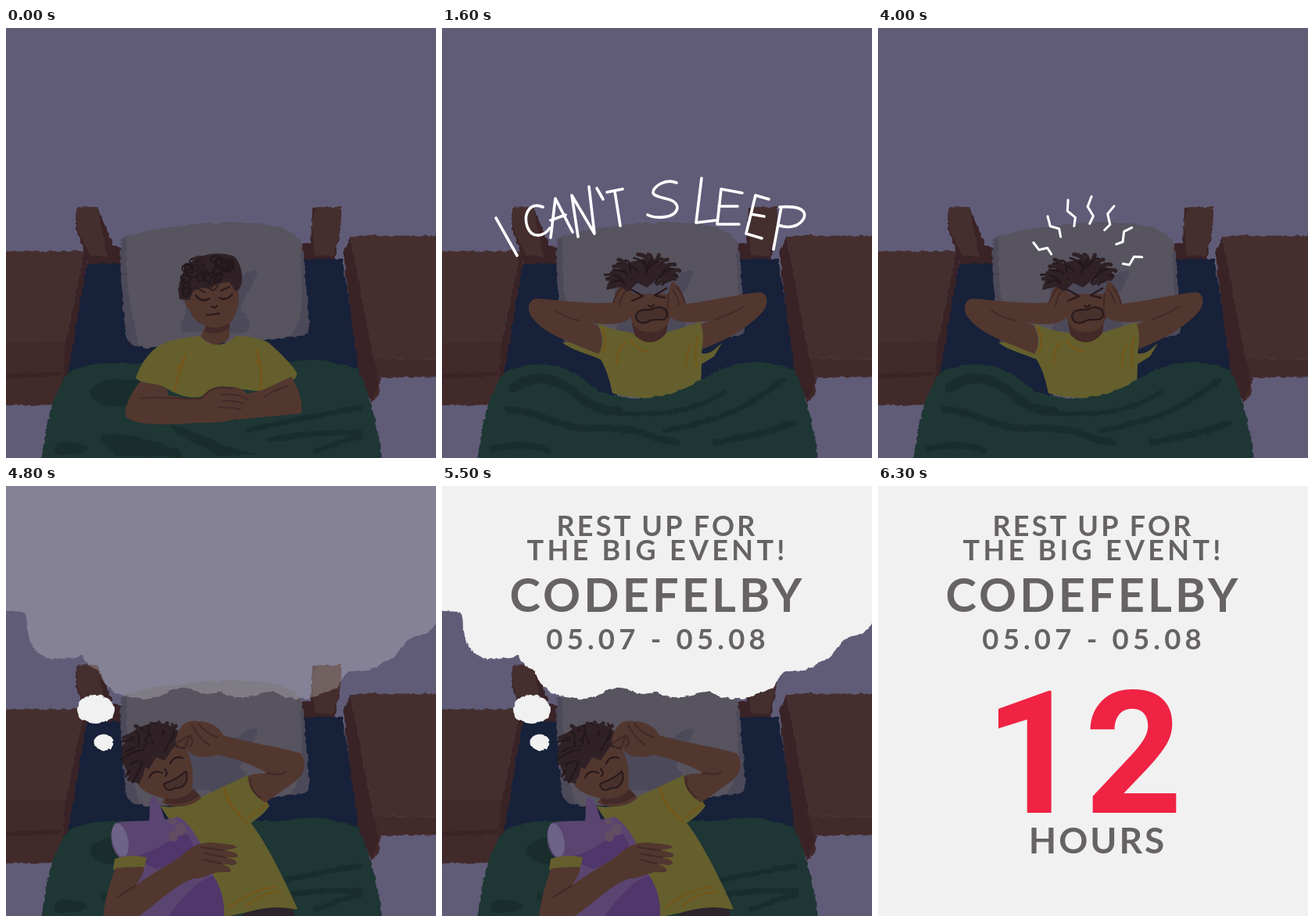
Write an HTML page that moves like this. It is 550 by 550 pixels and loops after 8.3 s.

```html
<!DOCTYPE html>
<html lang="en">
<head>
<meta charset="utf-8">
<title>Rest up</title>
<style>
  html, body { margin: 0; width: 100%; height: 100%; overflow: hidden; background: #605c78; }
  svg { display: block; width: 100vw; height: 100vh; }
  path, ellipse { stroke-linecap: round; stroke-linejoin: round; }
  .head { font-family: Lato, "Open Sans", sans-serif; font-weight: 700; fill: #676364; text-anchor: middle; }
  .count { font: 700 219px Roboto, "Open Sans", sans-serif; fill: #f02344; }
</style>
</head>
<body>
<svg id="stage" viewBox="0 0 550 550"></svg>
<script>
const LOOP = 8300;
const C = {
  wall: '#605c78', wood: '#452f2e', drawer: '#422a2a', woodDark: '#3a2326', navy: '#172139',
  pillow: '#57535f', fold: '#4c4959', green: '#1e3634', greenDark: '#192e2c',
  shirt: '#645f2d', crease: '#74561a', skin: '#52372f', skinDark: '#432927',
  hair: '#2f2125', strand: '#23181c', ink: '#291a1c', paper: '#f1f1f1',
  plush: '#5a4570', plushLight: '#6d6287', plushDark: '#50366a', pants: '#2d232a'
};

const fill = (d, color) => `<path d="${d}" fill="${color}"/>`;
const line = (d, color = C.ink, w = 2) => `<path d="${d}" fill="none" stroke="${color}" stroke-width="${w}"/>`;
const oval = (x, y, rx, ry, color, extra = '') =>
  `<ellipse cx="${x}" cy="${y}" rx="${rx}" ry="${ry}" fill="${color}" ${extra}/>`;
const group = (id, body) => `<g id="${id}">${body}</g>`;
const rough = body => `<g filter="url(#rough)">${body}</g>`;
const words = (text, y, size, gap) =>
  `<text class="head" x="${273.5 + gap / 2}" y="${y}" font-size="${size}" letter-spacing="${gap}">${text}</text>`;

function random(seed) {
  return () => (seed = (seed * 16807) % 2147483647) / 2147483647;
}

// Loose rings of curly hair inside an oval.
function curls(cx, cy, rx, ry, n, seed) {
  const r = random(seed);
  let out = '';
  for (let i = 0; i < n; i++) {
    const a = r() * 6.28, k = Math.sqrt(r()), w = 5 + r() * 4;
    const x = cx + rx * k * Math.cos(a), y = cy + ry * k * Math.sin(a);
    out += oval(x.toFixed(1), y.toFixed(1), w, w * .65, 'none',
      `stroke="${i % 3 ? C.strand : C.hair}" stroke-width="2" transform="rotate(${(r() * 180).toFixed()} ${x} ${y})"`);
  }
  return out;
}

// Uneven locks fanning out from a crown.
function locks(cx, cy, rx, ry, from, to, n, seed) {
  const r = random(seed);
  let out = '';
  for (let i = 0; i < n; i++) {
    const a = (from + (to - from) * i / (n - 1)) * Math.PI / 180, k = .78 + r() * .34;
    const s = .3 + r() * .35, bend = a + (r() - .3) * 1.1;
    const x = cx + rx * k * Math.cos(a), y = cy + ry * k * Math.sin(a);
    const x0 = cx + rx * s * Math.cos(bend), y0 = cy + ry * s * Math.sin(bend);
    out += line(`M${x0},${y0} Q${(x + x0) / 2 + 5},${(y + y0) / 2 - 7} ${x},${y}`, i % 2 ? C.strand : C.hair, i % 2 ? 2.5 : 5);
  }
  return out;
}

const room = rough(
  fill('M90,230 L117,229 L137,278 L147,280 L149,302 L106,303 L90,258Z', C.woodDark) +
  fill('M90,230 L117,229 L121,252 L130,292 L107,290 L91,257Z', C.wood) +
  fill('M392,230 L429,229 L428,256 L420,296 L378,298 L378,276 L390,274Z', C.woodDark) +
  fill('M397,229 L429,229 L428,254 L418,292 L396,290 L391,250Z', C.wood) +
  fill('M103,302 L430,295 L455,440 L455,470 L74,470 L80,405Z', C.navy) +
  fill('M-20,286 L100,285 L76,402 L-20,404Z', C.wood) +
  fill('M-20,403 L77,401 L73,470 L62,482 L-20,483Z', C.drawer) +
  fill('M100,285 L105,291 L97,340 L78,450 L73,452 L76,402Z', C.woodDark) +
  line('M-20,447 L68,442', C.woodDark, 6) +
  fill('M441,266 L570,265 L570,424 L470,422Z', C.wood) +
  fill('M470,422 L570,424 L570,446 L479,447 L477,470 L467,479 L460,446Z', C.drawer) +
  fill('M441,266 L470,422 L477,455 L467,478 L452,447 L434,310 L432,284Z', C.woodDark) +
  fill('M148,268 C190,255 260,247 310,249 C350,251 375,262 379,278 C382,320 388,360 388,385 C385,398 360,394 330,399 C270,405 210,409 180,409 C160,407 153,400 154,390 C149,350 145,300 148,268Z', C.pillow) +
  fill('M147,269 L154,268 C152,320 160,370 170,406 C155,405 153,395 153,388 C148,345 145,300 147,269Z', C.fold) +
  fill('M379,284 C382,330 387,360 388,385 C385,394 375,395 362,395 C380,385 382,340 376,290Z', C.fold) +
  fill('M224,320 C250,300 285,330 300,320 C310,308 321,308 321,314 C317,330 300,348 300,360 C318,378 315,392 295,390 L225,389 C219,378 231,366 230,354 C222,345 215,335 224,320Z', C.fold)
);

const quilt = d => fill(d, C.green);
const flat = rough(
  quilt('M43,575 C48,515 62,445 90,435 C125,424 150,432 190,428 L360,428 C395,418 430,430 449,436 C462,460 480,515 483,575Z') +
  fill('M108,462 C120,446 150,448 172,452 L165,474 C160,488 138,484 128,483 C115,478 105,472 108,462Z', C.greenDark) +
  fill('M62,540 C60,526 85,528 104,534 C110,542 95,546 62,546Z', C.greenDark) +
  fill('M121,520 C155,516 190,528 222,540 L225,548 L140,547 C135,535 120,534 121,520Z', C.greenDark) +
  fill('M210,508 C245,512 260,535 325,545 L270,547 C245,530 220,525 210,508Z', C.greenDark) +
  line('M310,515 Q370,500 452,486', C.greenDark, 7) +
  line('M338,527 Q390,515 453,518 M396,541 Q425,530 453,522', C.greenDark, 7)
);
const lump = rough(
  quilt('M43,575 C48,515 62,445 90,435 C130,424 160,432 185,452 C207,474 235,474 270,472 C320,468 335,440 375,430 C405,424 435,430 450,438 C462,460 480,515 483,575Z') +
  line('M92,460 C120,440 145,448 165,463 C185,480 200,490 225,490', C.greenDark, 12) +
  line('M85,488 C130,490 145,515 200,512 S260,525 300,530', C.greenDark, 9) +
  line('M225,492 C280,498 330,488 362,465', C.greenDark, 6) +
  line('M285,515 C340,505 390,490 436,450', C.greenDark, 7) +
  line('M350,530 Q410,520 450,505 M65,538 Q110,528 135,541', C.greenDark, 8)
);

const shutEyes = line('M243,342 Q250,352 260,346 M273,345 Q281,350 289,341', C.ink, 2.6) +
  line('M244,332 L254,338 M275,336 L286,331');
const openEyes = [251, 281].map(x => oval(x, 344, 7, 5, '#8b8587') + oval(x, 344, 3.2, 4, C.ink) +
  line(`M${x - 8},343 Q${x},336 ${x + 8},343`)).join('') + line('M242,334 Q250,329 257,333 M275,333 Q283,329 289,333');
const face = fill('M230,340 C230,328 240,315 265,315 C292,314 298,328 298,345 C297,362 292,371 286,378 L286,395 C278,408 260,408 249,394 L255,381 C243,377 236,366 234,359 C228,355 228,346 230,340Z', C.skin) +
  fill('M255,381 Q270,387 286,378 L286,384 Q270,395 255,388Z', C.skinDark) +
  line('M263,356 Q267,360 270,355');
const curly = fill('M222,347 C219,330 224,308 239,298 C252,287 280,286 293,293 C303,305 304,324 299,333 L294,337 L285,324 C270,326 258,336 248,332 L239,337 L235,348Z', C.hair) +
  curls(262, 312, 34, 18, 36, 71) + curls(229, 332, 4, 12, 6, 9);
const tee = fill('M205,402 C220,397 238,395 248,394 C260,409 283,408 293,394 C312,394 328,398 335,402 C350,414 367,432 372,441 C372,453 358,452 352,458 L330,465 C300,462 280,458 262,464 C250,475 236,474 222,469 L212,465 C195,452 172,457 166,447 C174,425 188,408 205,402Z', C.shirt) +
  line('M229,419 C224,440 217,450 216,464 M229,421 L219,436 M321,412 C326,430 328,448 325,464 M321,425 L327,437', C.crease, 3);
const folded = fill('M172,452 C160,466 150,487 153,497 C165,509 205,508 242,505 C290,506 307,498 309,488 L250,473 C236,478 222,470 207,470 L206,462 C195,453 180,456 172,452Z', C.skin) +
  fill('M328,463 L365,446 C374,460 380,480 378,493 C350,496 320,498 296,501 L300,470Z', C.skin) +
  fill('M248,478 C252,466 264,458 282,459 C300,457 315,468 310,482 C302,496 270,494 248,490Z', C.skin) +
  line('M172,474 C200,470 230,476 250,474 C262,458 275,458 288,461 M276,469 C290,468 305,470 310,476 M277,477 Q293,476 304,481 M272,485 Q290,485 300,488 M330,472 Q345,462 361,458', C.skinDark, 2);
const supine = eyes => tee + folded + face + curly + eyes + line('M257,367 Q265,367 273,365');

const side = fill('M190,402 C220,393 245,394 270,398 C310,396 342,405 352,425 L345,462 C300,462 265,470 220,468 C175,470 140,462 134,445 C148,420 170,408 190,402Z', C.shirt) +
  line('M215,415 C205,438 190,450 188,462 M300,410 Q318,430 310,455', C.crease, 3) +
  fill('M298,432 C330,436 350,420 362,392 C355,378 335,374 312,375 C300,370 296,358 306,354 C340,352 380,362 394,380 C398,410 370,450 340,464 C320,470 305,458 298,432Z', C.skin) +
  fill('M200,430 C225,424 260,438 300,446 C325,442 338,452 334,466 C310,484 250,486 212,470 C195,460 192,440 200,430Z', C.skin) +
  line('M300,446 Q318,452 330,452 M302,456 Q318,459 328,459 M312,375 Q330,374 352,384', C.skinDark) +
  `<g transform="rotate(16 266 350) translate(8 -4)">${face}${curly}${shutEyes}${line('M264,367 Q270,364 277,366')}</g>`;

const grip = fill('M199,377 C215,386 232,388 245,390 C258,405 275,405 286,390 L331,376 C337,392 333,408 332,416 C343,419 352,408 358,403 L348,420 L332,430 L331,462 C300,476 245,476 218,467 C214,450 212,440 203,424 C185,416 165,412 154,402 C170,400 190,412 200,414 C209,406 205,390 199,377Z', C.shirt) +
  fill('M243,376 L246,392 C258,406 276,405 287,390 L289,376Z', C.skinDark) +
  fill('M238,340 L296,340 C297,365 290,382 278,387 Q266,391 254,387 C242,382 236,362 238,340Z', C.skin) +
  fill('M240,324 C228,325 221,335 219,351 C190,354 140,347 120,346 C107,350 110,365 116,371 C130,391 165,402 200,417 C208,406 205,390 199,380 C190,376 182,376 176,374 C200,380 230,382 240,371 C246,360 244,338 240,324Z', C.skin) +
  fill('M294,324 C304,328 309,340 311,353 C340,350 380,340 408,338 C418,341 417,354 411,362 C390,385 365,398 333,411 C334,400 335,390 331,379 C340,375 345,373 350,373 C330,377 302,378 294,371 C286,360 288,340 294,324Z', C.skin) +
  line('M176,374 Q160,372 145,361 M219,351 Q224,338 232,330 M227,355 Q229,343 236,335 M311,353 Q308,340 300,331 M303,354 Q302,344 295,335 M350,373 Q372,365 386,356 M290,371 Q287,358 290,340', C.skinDark, 2) +
  fill('M210,335 C214,312 235,300 255,296 C275,292 297,305 303,319 L288,326 L277,320 L262,332 L250,326 L238,337 L228,331Z', C.hair) +
  locks(258, 327, 49, 35, 176, 348, 25, 33) +
  line('M241,334 L257,343 L243,349 M287,333 L272,342 L285,345 M264,355 Q268,359 271,354', C.ink, 2.4) +
  `<path d="M248,369 C249,358 263,361 268,360 C278,354 288,358 288,367 C286,377 275,371 267,374 C257,380 249,377 248,369Z" fill="#48302d" stroke="${C.ink}" stroke-width="2.3"/>` +
  line('M205,384 Q212,400 206,414 M235,402 C225,408 225,420 224,430 M242,400 Q250,412 263,414 M318,405 Q310,420 313,432 M328,394 Q322,415 326,434', C.crease, 2.5) + lump;

const feet = fill('M256,286 C246,284 225,298 221,312 C219,332 224,342 222,362 C221,378 212,390 205,412 C196,440 193,455 196,474 L205,518 L240,518 C237,480 239,440 245,410 C248,390 244,372 249,352 C250,330 257,315 258,298Z', C.skin) +
  fill('M283,287 C293,282 318,292 324,308 C326,325 325,342 325,360 C328,382 330,395 336,415 C345,440 344,470 341,490 L335,518 L298,518 C296,480 298,440 302,415 C304,395 296,380 296,365 C298,345 287,330 283,315 C279,300 280,292 283,287Z', C.skin) +
  line('M247,287 L246,302 M238,291 L239,306 M231,298 L232,309 M225,304 L227,315 M294,286 L296,299 M303,288 L304,302 M311,292 L311,305 M318,298 L317,310 M222,362 Q230,378 245,374 M296,367 Q311,374 326,362 M205,483 C203,496 213,505 224,503 C224,492 231,488 231,476 M311,482 C310,470 318,466 329,469', C.skinDark, 2) +
  fill('M304,480 Q320,476 335,480 L337,495 Q320,493 303,497Z', '#692642') +
  line('M314,479 L314,494 M328,479 L328,493', '#552038', 1.5) +
  fill('M180,516 Q212,512 241,514 L246,522 L245,550 L181,550Z M284,520 L291,514 Q320,516 340,514 L346,520 L343,550 L283,550Z', C.pants) +
  line('M183,520 L243,519 M222,524 L238,531 M225,530 L240,540 M287,520 L342,519 M292,526 L312,523 M290,534 L306,528', '#1e171c', 1.5);
const bubble = line('M383,437 C370,415 371,395 385,377 C400,355 425,345 450,344 C476,347 499,370 503,394 C503,420 490,440 470,455 C450,465 428,463 416,456 Q400,461 382,473 L384,450', '#fff', 3.6) +
  line('M410,431 L404,408 L435,427 L432,389 M447,382 C436,388 437,408 444,417 C458,426 470,408 467,393 C464,381 453,378 444,388', '#fff', 3.6);

const torso = fill('M197,409 C215,413 235,409 245,400 L309,370 C318,385 330,398 337,409 C330,420 318,428 313,431 C332,455 352,495 373,541 L305,546 L270,553 L238,470Z', C.shirt) +
  line('M279,386 C284,405 296,422 309,430 M280,390 Q284,410 300,420 M311,424 L334,407 M286,539 Q315,515 345,513 M308,537 Q330,518 352,520', C.crease, 2.6) +
  fill('M305,546 Q340,535 367,541 L369,553 L300,553Z', C.pants);
const grinHead = fill('M168,372 C175,345 205,325 229,334 C239,350 240,370 238,386 L250,399 C235,413 210,412 199,405 L203,400 C185,394 166,390 168,372Z', C.skin) +
  fill('M203,399 Q226,404 240,388 L248,396 Q230,410 205,406Z', C.skinDark) +
  fill('M149,352 C145,330 160,305 190,304 C215,300 230,320 229,337 L215,333 L203,351 L192,347 L183,362 L176,359 L171,381 L160,378Z', C.hair) +
  locks(188, 343, 41, 43, 120, 325, 29, 17) +
  line('M183,373 Q188,362 200,367 M210,355 Q215,344 226,348 M203,362 Q208,367 204,371', C.ink, 2.2) +
  `<path d="M202,381 C210,378 221,374 230,365 C235,376 227,388 217,386 C211,391 203,390 202,381Z" fill="#48302d" stroke="${C.ink}" stroke-width="2"/>`;
const raised = fill('M309,371 C318,367 330,368 334,367 C318,358 295,348 270,344 C250,350 235,345 229,334 C220,335 214,330 218,321 C223,304 232,299 246,301 C262,301 274,310 278,319 C310,328 350,334 377,342 C385,352 383,368 371,377 C355,388 340,400 331,405 C320,397 310,385 309,371Z', C.skin) +
  line('M334,367 Q350,371 358,366 M218,329 L235,319 L229,335 M236,320 Q242,329 235,333 M247,305 Q258,318 270,321 M238,306 Q247,323 260,331 M313,374 Q309,385 325,399', C.skinDark, 2.4);
const sprawl = torso + fill('M203,411 C180,414 155,425 142,438 C125,432 112,423 106,432 C108,450 125,465 150,468 C180,466 205,456 225,448Z', C.skin) +
  fill('M197,409 C183,414 174,422 168,432 L184,465 L235,465Z', C.shirt) + grinHead + raised;
const cuddle = torso +
  fill('M140,431 C165,426 195,431 220,423 C240,432 256,470 266,500 Q280,520 279,553 L165,553 C160,520 155,490 144,474 C132,462 132,440 140,431Z', C.plush) +
  fill('M206,553 C225,525 250,500 265,499 Q280,520 279,553Z', C.plushDark) +
  fill('M155,474 C190,474 205,450 232,445 L242,465 Q210,485 193,490 Z', C.plushDark) +
  oval(146, 453, 10, 22, C.plushLight, 'transform="rotate(-12 146 453)"') +
  fill('M183,428 C185,415 182,400 188,397 C198,402 199,418 204,428Z', C.plush) +
  oval(213, 429, 5, 4, '#624d62') + oval(223, 439, 7, 8, '#624d62') + oval(214, 448, 6, 7, '#624d62') +
  fill('M139,477 Q158,470 180,475 L177,488 Q155,489 137,491Z', C.shirt) +
  fill('M140,489 Q155,487 176,487 C178,494 170,505 166,511 C188,495 210,483 223,474 C236,462 247,455 264,456 C280,458 295,458 295,463 L279,466 C295,468 300,472 294,475 L281,475 C298,478 298,484 290,485 L275,483 C291,488 290,495 281,494 C264,492 257,502 240,502 C215,510 190,538 165,553 L124,553 C126,530 133,506 140,489Z', C.skin) +
  line('M250,462 L279,466 M253,470 L281,475 M253,478 L275,483 M166,511 Q151,520 143,526', C.skinDark, 2.2) + grinHead + raised;

const letters = [
  'M69,243 L96,291', 'M129,229 C112,222 104,238 109,254 C115,270 130,267 138,256',
  'M139,268 L145,218 L167,261 M139,246 L158,239', 'M174,267 L166,214 L195,263 L188,203',
  'M198,205 L206,219', 'M211,210 L231,206 M221,209 L228,253',
  'M300,198 C286,192 269,203 270,211 C274,220 300,215 301,230 C299,244 273,244 263,239',
  'M332,192 L325,249 L350,246', 'M357,206 L352,251 L380,251 M357,206 L384,211 M354,228 L378,228',
  'M401,214 L389,263 L409,269 M401,214 L418,219 M395,238 L412,241',
  'M434,229 L424,283 M432,229 C473,226 467,245 454,252 Q443,257 430,252'
];
function shout(phase) {
  const r = random(101 + phase * 577);
  const off = () => (phase ? (r() - .5) * 3 : 0).toFixed(1);
  return letters.map(d => `<g transform="translate(${off()} ${off()})">${line(d, '#fff', 3.6)}</g>`).join('');
}
function stress(phase) {
  let d = '';
  for (let i = 0; i < 7; i++) {
    const a = (200 + i * 23.5 + (phase % 2) * 5) * Math.PI / 180, c = Math.cos(a), s = Math.sin(a);
    const at = (k, n) => `${(266 + 74 * c * k - s * n).toFixed(1)},${(318 + 103 * s * k + c * n).toFixed(1)}`;
    d += `M${at(.66, 0)} L${at(.76, 4)} L${at(.87, -4)} L${at(1, 0)}`;
  }
  return line(d, '#fff', 3);
}

const sheets = {
  sleep: flat + supine(shutEyes), wake: flat + supine(openEyes),
  right: flat + side, left: flat + `<g transform="matrix(-1 0 0 1 523 0)">${side}</g>`,
  grip, feet: flat + feet + bubble, sprawl: flat + sprawl + `<g transform="translate(18 -204)">${bubble}</g>`,
  cuddle: flat + cuddle
};
for (let i = 0; i < 4; i++) {
  sheets['shout' + i] = shout(i % 2);
  sheets['stress' + i] = stress(i);
}

document.getElementById('stage').innerHTML = `
<defs><filter id="rough" filterUnits="userSpaceOnUse" x="-30" y="-30" width="610" height="610" color-interpolation-filters="sRGB">
  <feTurbulence type="fractalNoise" baseFrequency=".13" numOctaves="2" seed="4"/>
  <feDisplacementMap in="SourceGraphic" scale="5" xChannelSelector="R" yChannelSelector="G"/>
</filter></defs>
<rect width="550" height="550" fill="${C.wall}"/>` +
  group('scene', room + Object.entries(sheets).map(([id, body]) => group(id, body)).join('')) +
  group('veil', `<rect width="550" height="550" fill="${C.paper}"/>`) +
  group('dots', group('dot', rough(oval(125, 328, 12.5, 10.5, C.paper))) + group('puff', rough(oval(115, 285.5, 24, 18.5, C.paper)))) +
  group('cloud', rough(fill('M-25,158 L22,161 C31,167 23,185 31,199 C45,225 62,224 98,217 Q101,230 119,237 C126,262 145,268 165,271 Q185,275 200,267 Q222,252 240,261 T275,264 Q297,275 320,267 T352,268 Q382,278 408,264 L425,258 Q432,239 440,237 Q470,237 482,226 Q498,220 503,210 Q515,192 530,191 Q545,187 552,172 L575,165 L575,-25 L-25,-25Z', C.paper))) +
  group('title', words('REST UP FOR', 64, 36, 3.2) + words('THE BIG EVENT!', 95, 36, 4.3) +
    words('CODEFELBY', 160.5, 59.5, 4.1) + words('05.07 - 05.08', 208.5, 36.5, 5.2)) +
  group('timer', '<text class="count" x="136 264" y="418">12</text>' +
    `<g transform="translate(6 0)">${words('HOURS', 470, 46, 3)}</g>`);

const parts = {};
document.querySelectorAll('g[id]').forEach(g => parts[g.id] = g);

const cues = [
  [0, 'sleep'], [200, 'wake'], [700, 'right'], [900, 'left'], [1100, 'wake'], [1600, 'grip', 'shout'],
  [2400, 'sprawl'], [2900, 'feet'], [3400, 'grip', 'stress'], [4200, 'cuddle']
];
// Fades advance once every 100 ms, reaching a first step at their start.
const fade = (t, start, step) => Math.max(0, Math.min(1, (Math.floor((t - start) / 100) + 1) * step));

function draw(t) {
  const [start, pose, mark] = cues.filter(c => c[0] <= t).pop();
  const extra = mark && mark + Math.floor((t - start) / 200);
  for (const id in sheets) parts[id].style.display = id === pose || id === extra ? '' : 'none';
  const veil = fade(t, 5600, .19);
  // Night colours warm up as the page brightens.
  parts.scene.style.filter = veil ? `saturate(${1 + veil * 1.6})` : '';
  const alpha = {
    dot: +(t >= 4400), puff: +(t >= 4600), dots: Math.max(0, 1 - veil * 1.4),
    cloud: fade(t, 4800, .26), title: fade(t, 5200, .25), veil, timer: fade(t, 6000, .25)
  };
  for (const id in alpha) parts[id].style.opacity = alpha[id];
}

const began = performance.now();
function tick() {
  draw((performance.now() - began) % LOOP);
  requestAnimationFrame(tick);
}
tick();
</script>
</body>
</html>
```
